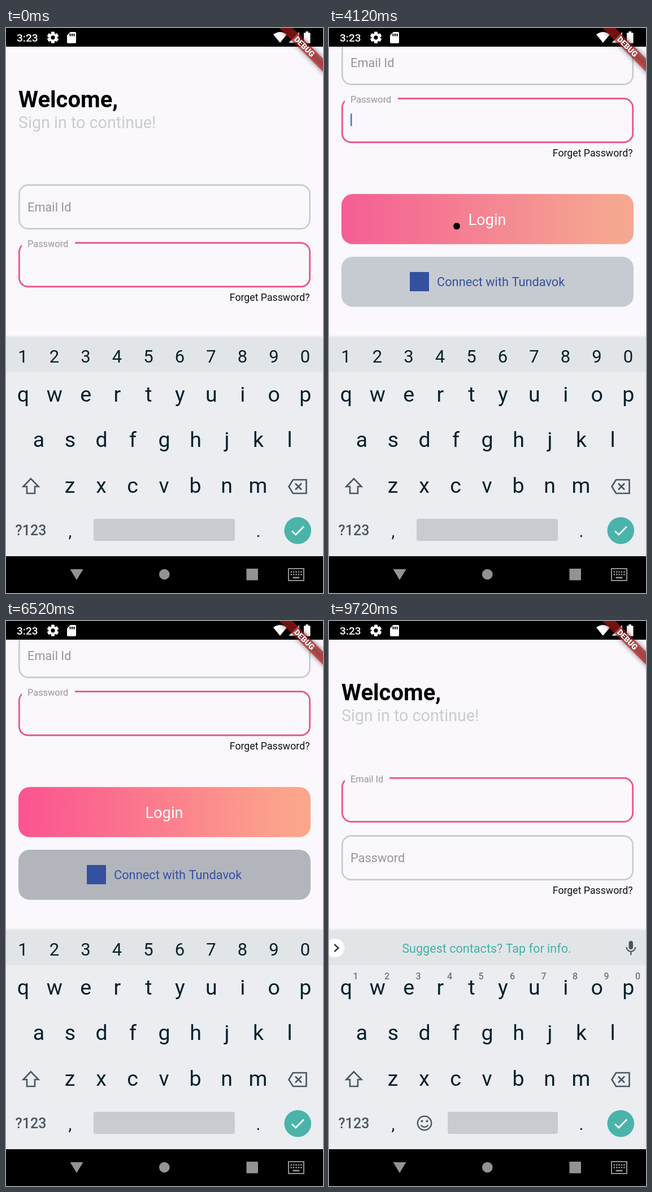
Recreate the animation shown at these times as an HTML page with a canvas. Size 561 px wide and 998 px high, loop 9.76 s.

```html
<!DOCTYPE html>
<html lang="en">
<head>
<meta charset="utf-8">
<title>Sign in screen</title>
<style>
html, body { margin: 0; width: 100%; height: 100%; overflow: hidden; background: #000; }
canvas { display: block; width: 561px; height: 998px; }
</style>
</head>
<body>
<canvas id="stage" width="561" height="998"></canvas>
<script>
const ctx = document.getElementById('stage').getContext('2d');
const LOOP = 9760, SCROLL = 255, FOCUS_MS = 200, KEYBOARD_LAG = 80;
const PINK = '#f0508a', GREY = '#c6ccce', INK = '#06202b', KEY_ICON = '#4a5660', TEAL = '#4ab3aa';

// Focus changes: when the field is tapped, and when its cursor starts blinking.
const focusEvents = [
  { at: -900, blink: -900, field: 'password' },
  { at: 800, blink: 940, field: 'email' },
  { at: 1780, blink: 1920, field: 'password' },
  { at: 8640, blink: 8780, field: 'email' }
];
const touches = [
  { from: 700, to: 800, x: 210, y: 320 },
  { from: 1680, to: 1780, x: 210, y: 424 },
  { from: 2800, to: 3300, x: 290, y: 500, dy: -SCROLL },
  { from: 3960, to: 4200, x: 226, y: 350 },
  { from: 6320, to: 6480, x: 226, y: 452 },
  { from: 7050, to: 7550, x: 290, y: 245, dy: SCROLL },
  { from: 8480, to: 8640, x: 210, y: 320 }
];

const clamp = v => Math.max(0, Math.min(1, v));
const ease = v => { v = clamp(v); return v * v * (3 - 2 * v); };
const ramp = (t, from, to) => ease((t - from) / (to - from));
const mix = (a, b, k) => a + (b - a) * k;
const pulse = (t, from, to, fade) => ramp(t, from, from + fade) - ramp(t, to - fade, to);

function rect(x, y, w, h, color, r = 0) {
  ctx.fillStyle = color;
  ctx.beginPath();
  ctx.roundRect(x, y, w, h, r);
  ctx.fill();
}

function circle(x, y, r, color) {
  ctx.fillStyle = color;
  ctx.beginPath();
  ctx.arc(x, y, r, 0, Math.PI * 2);
  ctx.fill();
}

function text(str, x, y, size, color, align = 'left', weight = 400) {
  ctx.font = `${weight} ${size}px Roboto, sans-serif`;
  ctx.textAlign = align;
  ctx.fillStyle = color;
  ctx.fillText(str, x, y);
}

function fillPath(d, color) {
  ctx.fillStyle = color;
  ctx.fill(new Path2D(d));
}

function strokePath(d, color, width) {
  ctx.strokeStyle = color;
  ctx.lineWidth = width;
  ctx.stroke(new Path2D(d));
}

function focusAt(t) {
  const i = focusEvents.findLastIndex(e => e.at <= t);
  const now = focusEvents[i], before = focusEvents[i - 1];
  const k = ramp(t, now.at, now.at + FOCUS_MS);
  const level = { email: 0, password: 0 };
  if (before) level[before.field] = 1 - k;
  level[now.field] = k;
  const keyboard = before && t < now.at + KEYBOARD_LAG ? before.field : now.field;
  const phase = now.blink < 0 ? t + 900 : Math.max(0, t - now.blink);
  return { field: now.field, level, keyboard, cursor: phase % 1000 < 500 };
}

function drawField(label, top, gapEnd, level, cursor) {
  ctx.save();
  if (level > 0) {
    const clip = new Path2D();
    clip.rect(0, 0, 561, 998);
    clip.rect(28, top - 5, (gapEnd - 28) * level, 14);
    ctx.clip(clip, 'evenodd');
  }
  ctx.lineWidth = 2.7;
  ctx.beginPath();
  ctx.roundRect(23.3, top, 514.4, 77.2, 16);
  ctx.strokeStyle = GREY;
  ctx.stroke();
  ctx.globalAlpha = level;
  ctx.strokeStyle = PINK;
  ctx.stroke();
  ctx.restore();
  text(label, 38, top + mix(46.5, 7.6, level), mix(21.8, 16.36, level), '#969599');
  if (cursor) rect(38, top + 26.5, 2.7, 22, '#447de0');
}

function drawPage(t, focus) {
  rect(0, 33, 561, 900, '#faf8fc');
  ctx.save();
  ctx.beginPath();
  ctx.rect(0, 33, 561, 514);
  ctx.clip();
  ctx.translate(0, -SCROLL * (ramp(t, 2800, 3300) - ramp(t, 7050, 7550)));

  text('Welcome,', 22, 139.5, 40, '#000', 'left', 600);
  text('Sign in to continue!', 22, 177, 28.7, '#c8cdd0');
  const showCursor = name => focus.cursor && focus.field === name;
  drawField('Email Id', 277.4, 107, focus.level.email, showCursor('email'));
  drawField('Password', 379.7, 122, focus.level.password, showCursor('password'));
  text('Forget Password?', 537.5, 482, 17.73, '#111', 'right');

  const blend = ctx.createLinearGradient(22, 0, 539, 0);
  blend.addColorStop(0, '#fb548f');
  blend.addColorStop(0.06, '#fb5890');
  blend.addColorStop(0.92, '#fca48b');
  blend.addColorStop(1, '#fca68c');
  rect(22, 548.3, 517, 88.5, blend, 20);
  rect(22, 548.3, 517, 88.5, `rgba(188,188,188,${0.1 * pulse(t, 4000, 4400, 100)})`, 20);
  text('Login', 280, 603, 27.27, '#fff', 'center');

  rect(22, 659, 517, 88.5, '#c6cbd1', 20);
  rect(22, 659, 517, 88.5, `rgba(0,0,0,${0.1 * pulse(t, 6360, 6680, 100)})`, 20);
  rect(143, 686, 34, 34, '#3650a0');
  text('Connect with Tundavok', 191, 711, 21.8, '#3650a0');
  ctx.restore();
}

function drawKeyRow(keys, x, y, size, color = INK, weight = 400) {
  [...keys].forEach((key, i) => text(key, x + i * 55.5, y, size, color, 'center', weight));
}

function drawSuggestions() {
  rect(-6, 561, 33.5, 33, '#fff', 16.5);
  strokePath('M9.5 571 L16.5 577.5 L9.5 584', '#37434b', 2.8);
  text('Suggest contacts? Tap for info.', 279, 586, 21.6, '#45b0a7', 'center');
  rect(530.5, 565, 7.5, 15, KEY_ICON, 3.75);
  strokePath('M526.5 576 a7.8 7.8 0 0 0 15.6 0 M534.3 584 V590', KEY_ICON, 2.2);
}

function drawEmoji() {
  strokePath('M156.8 887 a12.2 12.2 0 1 0 24.4 0 a12.2 12.2 0 1 0 -24.4 0', KEY_ICON, 2.4);
  circle(164.5, 883.5, 2, KEY_ICON);
  circle(173.5, 883.5, 2, KEY_ICON);
  strokePath('M162.5 890.5 Q169 897.5 175.5 890.5', KEY_ICON, 2.2);
}

function drawKeyboard(forEmail) {
  const shade = ctx.createLinearGradient(0, 542, 0, 548);
  shade.addColorStop(0, 'rgba(0,0,0,0)');
  shade.addColorStop(1, 'rgba(0,0,0,0.1)');
  rect(0, 542, 561, 6, shade);
  rect(0, 547, 561, 61, '#e2e5e8');
  rect(0, 608, 561, 325, '#ebedf1');

  if (forEmail) {
    drawSuggestions();
    drawKeyRow('1234567890', 47, 632.5, 16, '#6d757b', 500);
    drawEmoji();
  } else {
    drawKeyRow('1234567890', 30, 590.5, 31);
  }
  drawKeyRow('qwertyuiop', 30.3, 660, 37.5);
  drawKeyRow('asdfghjkl', 58, 740, 37.5);
  drawKeyRow('zxcvbnm', 113, 820.5, 37.5);

  strokePath('M44 796 L30.5 810 H37 V822 H51 V810 H57.5 Z', KEY_ICON, 2.6);
  strokePath('M508 798 H531.5 V822 H508 L500.5 810 Z M512 804.5 L523 815.5 M523 804.5 L512 815.5', KEY_ICON, 2.6);

  text('?123', 44, 896, 25, KEY_ICON, 'center', 500);
  text(',', 113.5, 899, 30, INK, 'center');
  text('.', 446.5, 899, 30, INK, 'center');
  const spaceLeft = forEmail ? 210 : 155;
  rect(spaceLeft, 867, 405 - spaceLeft, 39, '#c8cbcf', 4);
  circle(516.3, 887.7, 23.8, TEAL);
  strokePath('M506 888.5 L512.7 895 L527 880.5', '#fff', 2.8);
}

function drawNavBar() {
  const color = '#949297';
  rect(0, 933, 561, 65, '#000');
  fillPath('M113.5 956 H136.5 L125 975 Z', color);
  circle(280.3, 965, 9.3, color);
  rect(425.5, 955, 20.5, 20.5, color, 1);
  ctx.strokeStyle = color;
  ctx.lineWidth = 2;
  ctx.strokeRect(500, 955, 27, 21);
  for (let row = 0; row < 2; row++) {
    for (let col = 0; col < 5; col++) rect(503.5 + col * 4.4, 959.5 + row * 4.6, 2.6, 2.6, color);
  }
  rect(507.5, 969.5, 12, 2.8, color);
}

function drawGear(x, y) {
  ctx.save();
  ctx.translate(x, y);
  for (let i = 0; i < 6; i++) {
    rect(-3, -10, 6, 20, '#fff', 1);
    ctx.rotate(Math.PI / 3);
  }
  circle(0, 0, 7.6, '#fff');
  circle(0, 0, 3.6, '#000');
  ctx.restore();
}

function drawStatusBar() {
  rect(0, 0, 561, 33, '#000');
  text('3:23', 19, 23.5, 19.1, '#fff', 'left', 500);
  drawGear(83, 16.8);
  fillPath('M114 7 H122 Q124 7 124 9 V25 Q124 27 122 27 H110 Q108 27 108 25 V13 Z', '#fff');
  for (const x of [112.5, 116, 119.5]) rect(x, 10, 2, 4.5, '#000');
  fillPath('M485 26 L473 11.5 Q485 2.5 497 11.5 Z', '#fff');
  fillPath('M519 7 V26 H500.5 Z', '#fff');
  fillPath('M530.5 6 H535 V8.5 H538.5 V27 H527 V8.5 H530.5 Z', '#fff');
}

function drawBanner() {
  ctx.save();
  ctx.translate(561, 0);
  ctx.rotate(Math.PI / 4);
  ctx.filter = 'blur(5px)';
  rect(-70, 38.2, 140, 16.4, 'rgba(0,0,0,0.5)');
  ctx.filter = 'none';
  rect(-70, 38.2, 140, 16.4, 'rgba(183,28,28,0.627)');
  text('DEBUG', 0, 51.4, 13.9, '#fff', 'center', 900);
  ctx.restore();
}

function drawTouch(t) {
  for (const { from, to, x, y, dy = 0 } of touches) {
    if (t >= from && t < to) circle(x, y + dy * ramp(t, from, to), 6, '#000');
  }
}

function render(t) {
  const focus = focusAt(t);
  drawPage(t, focus);
  drawKeyboard(focus.keyboard === 'email');
  drawNavBar();
  drawStatusBar();
  drawBanner();
  drawTouch(t);
}

const start = performance.now();
function tick() {
  render((performance.now() - start) % LOOP);
  requestAnimationFrame(tick);
}
tick();
</script>
</body>
</html>
```
